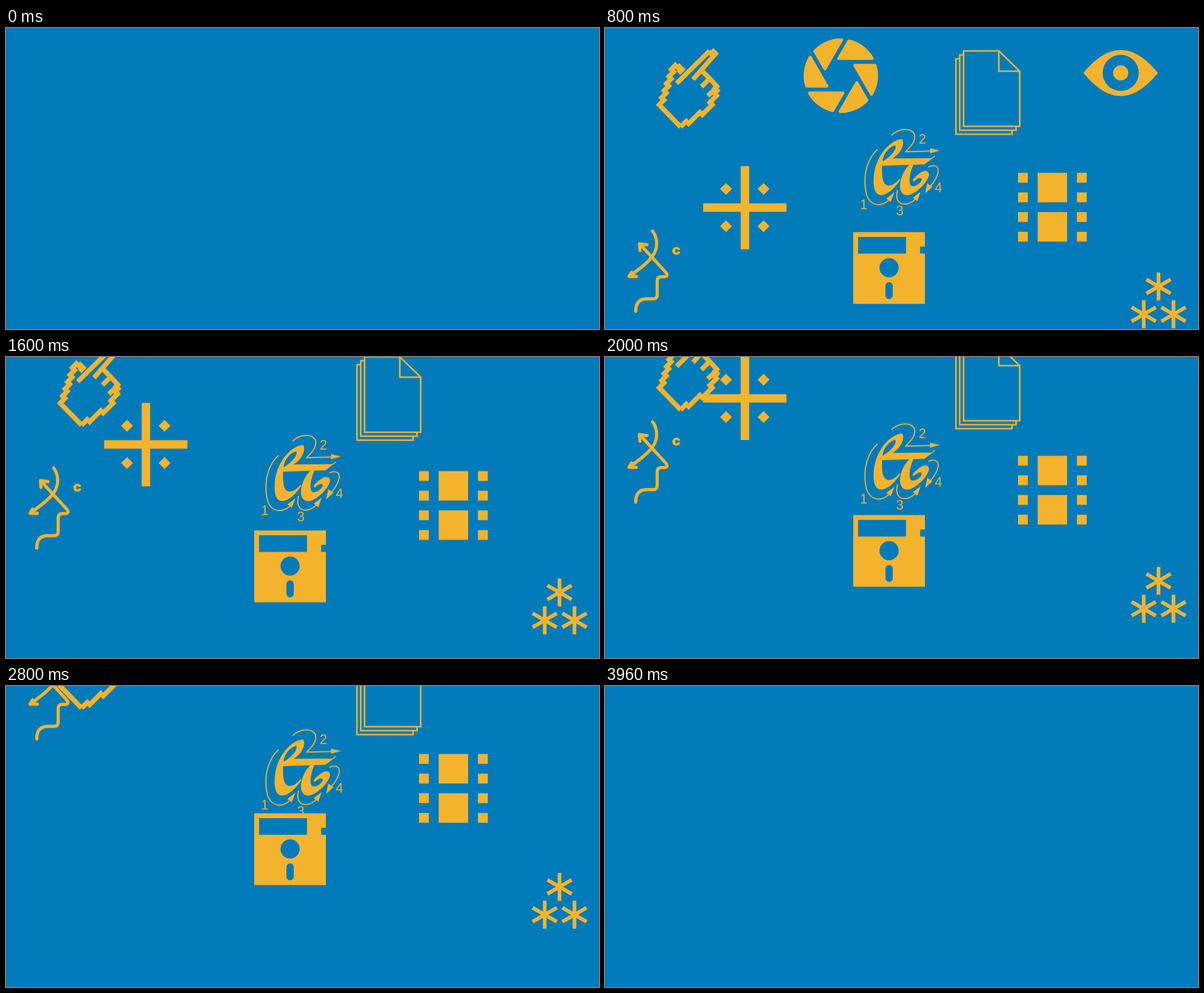
Animation of 1051 by 533 pixels, one loop 4 s. Source, as an HTML page:

```html
<!DOCTYPE html>
<html lang="en">
<head>
<meta charset="utf-8">
<title>Floating icons</title>
<style>
  html, body { margin: 0; width: 100%; height: 100%; overflow: hidden; background: #027bbb; }
  svg { display: block; width: 1051px; height: 533px; fill: #f3b32d; }
  .line { fill: none; stroke: #f3b32d; }
  .digits { font: 23.5px "Liberation Sans", Arial, sans-serif; }
  .letter { font: 900 26px Inter, sans-serif; text-anchor: middle; }
</style>
</head>
<body>
<svg viewBox="0 0 1051 533">
  <defs>
    <path id="blade" d="M-3.8-30.5H55.7A63.5 63.5 0 0 0 14.4-61.8Z" stroke="#f3b32d" stroke-width="5" stroke-linejoin="round"/>
    <path id="star" class="line" stroke-width="6.5" d="M0-24.8V24.8M-21.5-12.4 21.5 12.4M-21.5 12.4 21.5-12.4"/>
    <path id="diamond" d="M0-10.6 10.6 0 0 10.6-10.6 0Z"/>
  </defs>

  <g data-speed="204">
    <g id="aperture" transform="translate(418 84.5)"></g>
    <path id="eye" fill-rule="evenodd" d="M848 79.5C868 55 890 39 914 39S960 55 980 79.5C960 104 938 120.5 914 120.5S868 104 848 79.5Z
      M882 79.5a32 32 0 1 0 64 0a32 32 0 1 0-64 0Z M900.5 79.5a13.5 13.5 0 1 0 27 0a13.5 13.5 0 1 0-27 0Z"/>
    <g id="cross">
      <path d="M240.5 244.5h15v66h66v15h-66v66.5h-15v-66.5h-66.5v-15h66.5Z"/>
      <use href="#diamond" x="214.5" y="285"/>
      <use href="#diamond" x="281" y="285"/>
      <use href="#diamond" x="214.5" y="351"/>
      <use href="#diamond" x="281" y="351"/>
    </g>
    <g id="face">
      <path class="line" stroke-width="5.6" stroke-linejoin="round" d="M83 357.5C93 370 95 388 85 403C76 416 59 428 44 439
        M63 384 108 433Q113 440 105 440.5H99Q92.500 441 92.500 448V472Q92.500 479.500 85 479.500H73C60 480 54.500 488 54.500 501"/>
      <path class="line" stroke-width="5.6" stroke-linejoin="round" stroke-linecap="round"
        d="M47 432.500 42.500 440 55.500 440M62 394 61 382 74.500 384M54.500 500v1.500"/>
      <text class="letter" x="126.300" y="401.500">c</text>
    </g>
  </g>

  <g data-speed="68">
    <path id="hand" class="line" stroke-width="8.5" d=""/>
    <g id="film"></g>
    <path id="disk" fill-rule="evenodd" d="M440 361.500H567V387H558.500V399.500H567V488.500H440Z
      M448.500 370V399.500H533.500V370Z M486.500 424.500a17 17 0 1 0 34 0a17 17 0 1 0-34 0Z
      M497 456.500a6.500 6.500 0 0 1 13 0V473.500a6.500 6.500 0 0 1-13 0Z"/>
  </g>

  <g data-speed="51">
    <path id="pages" class="line" stroke-width="2.8" d="M635.500 40.500H698L735 76.500V174H635.500ZM698 40.500V76.500H735
      M635 47.500H628.700V181H728.500V174M628 54.500H622V188H721.500V181"/>
    <g id="ampersand">
      <path fill-rule="evenodd" d="M527 197C512 195 476 222 476 272C476 288 481 296 490 296C501 296 515 282 524 268L522 267
        C514 277 505 281 499 278C493 276 491 266 491 252V241C496 240 505 235 514 228C527 219 531 203 527 197Z
        M492 236C493 222 505 210 514 208C518 210 512 225 492 236Z"/>
      <path d="M491 241 510 231 578 230.500 584 226 585.500 227 566 241.500 491 244Z"/>
      <path d="M541 241C530 250 522 268 523 283C524 293 530 297 538 296C552 293 570 275 574 262C576 253 568 251 561 255
        C553 260 547 266 545 270L547 272C553 266 559 264 561 267C563 272 552 281 544 280C538 278 538 262 547 241Z"/>
      <path class="line" stroke-width="2" d="M483 215C466 230 457 258 462 288C466 314 487 319 503 305
        M508 190C522 175 549 177 549 192C549 204 540 211 533 219L580 218
        M518.500 287C515 300 518 311 530 312C540 312 546 307 551 302
        M573 246C582 242 592 243 590.500 255C589 264 584 272 576 281"/>
      <path d="M513 291 498.500 302 506.500 308ZM594 217 576 213V222ZM559.500 290 545.500 300.500 553.500 307ZM567.500 293 571 275 580.500 281Z"/>
      <g class="digits">
        <text x="452" y="321">1</text>
        <text x="556" y="205">2</text>
        <text x="516" y="331.500">3</text>
        <text x="584.500" y="290.500">4</text>
      </g>
    </g>
    <use href="#star" x="981" y="457.700"/>
    <use href="#star" x="954.800" y="507"/>
    <use href="#star" x="1007.500" y="507"/>
  </g>
</svg>

<script>
const LOOP = 4, STEPS = 100, POSE = 0.8;
const $ = id => document.getElementById(id);

// Icons built from repeated pieces
$('aperture').innerHTML = [0, 60, 120, 180, 240, 300]
  .map(a => `<use href="#blade" transform="rotate(${a})"/>`).join('');

const square = (x, y, s) => `<rect x="${x}" y="${y}" width="${s}" height="${s}"/>`;
$('film').innerHTML = square(766.8, 256.4, 52.2) + square(766.8, 326, 52.2) +
  [0, 1, 2, 3].map(i => square(732, 256.4 + 34.8 * i, 17.4) + square(836.4, 256.4 + 34.8 * i, 17.4)).join('');

$('hand').setAttribute('d',
  'M130.500 80 137 73.500 131.500 68 129 70.500 124.500 66 117.500 73.500' +
  'l4.100 4.100l-8.400 8.400'.repeat(0) +
  'M134 175 96 136' + 'l8.400-8.400l-4.100-4.100'.repeat(5) + 'l7-7' +
  'M134 175l10-10l4.200 4.200l20-20l4.200 4.200L190 136l-4.200-4.200l12-12l-4-4l5-5l-4-4l3.500-3.500L186 90 172 76' +
  'M127 98 185.500 40.500M184 41.500l4 4l4-4l4 4L156 91M186 89 171 104M198 106 182 120');

// Slow steady drift, with a rush in at the start and out at the end
const cube = x => Math.max(0, x) ** 3;
const drift = t => t - 41.4 * cube(0.742 - t) + 26.75 * cube(t - 3.292);

for (const layer of document.querySelectorAll('[data-speed]')) {
  const speed = +layer.dataset.speed;
  const frames = Array.from({ length: STEPS + 1 }, (_, i) => ({
    offset: i / STEPS,
    easing: 'step-end',
    transform: `translateY(${(speed * (drift(POSE) - drift(i * LOOP / STEPS))).toFixed(2)}px)`
  }));
  layer.animate(frames, { duration: LOOP * 1000, iterations: Infinity });
}
</script>
</body>
</html>
```
